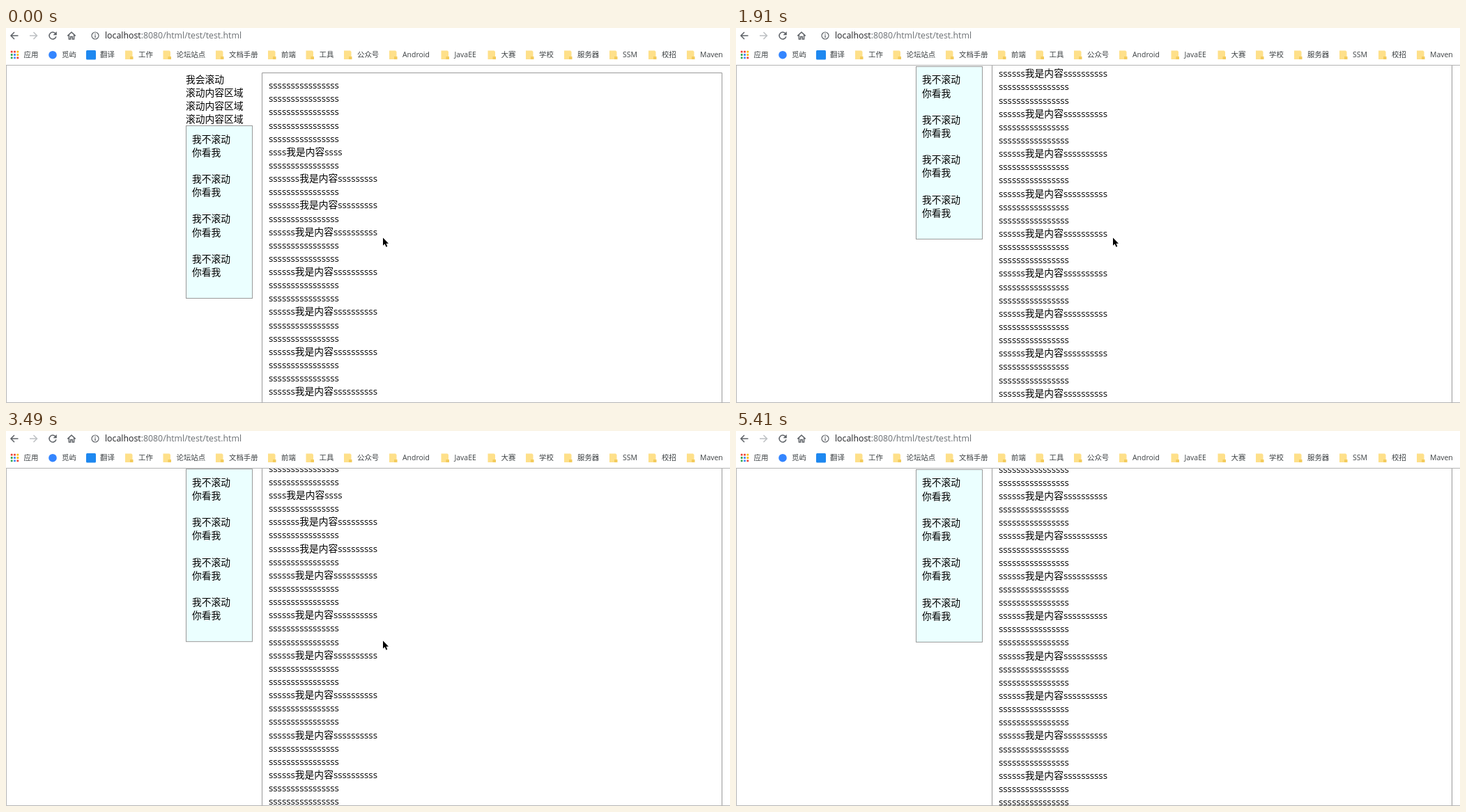
An HTML page for the animation above (5690 ms loop, 1039 by 539 pixels).

```html
<!DOCTYPE html>
<html lang="zh-CN">
<head>
<meta charset="utf-8">
<style>
html, body { margin: 0; width: 100%; height: 100%; overflow: hidden; background: #fff; }
svg { display: block; }
text { font: 13.77px "Open Sans", "Noto Sans CJK SC", "Noto Sans CJK", sans-serif; white-space: pre; }
.latin { font-size: 13.23px; }
.url { font-size: 12.33px; }
.mark { font-size: 10.45px; fill: #3c4043; }
.icon { fill: none; stroke: #5f6368; stroke-width: 1.5; }
.line { stroke: #999; fill: none; }
</style>
</head>
<body>
<svg width="1039" height="539" viewBox="0 0 1039 539">
  <defs><clipPath id="view"><rect y="54" width="1039" height="484"/></clipPath></defs>
  <g clip-path="url(#view)">
    <g id="page">
      <path class="line" d="M367.5 900V64.5H1027.5V900"/>
    </g>
    <g id="side">
      <rect class="line" style="fill:#ebffff" x="258.5" y="140.5" width="95" height="248"/>
    </g>
  </g>
  <path class="line" style="stroke:#b4b4b4" d="M0 53.5H1039M.5 54V538.5H1039"/>
  <g id="bar">
    <path class="icon" d="M17.5 11H7.5M12 6L7 11L12 16"/>
    <path class="icon" style="stroke:#bdc0c3" d="M34 11H44M39.5 6L44.5 11L39.5 16"/>
    <path class="icon" d="M71.2 8.2A5 5 0 1 0 71.9 12.2"/>
    <path fill="#5f6368" d="M72.8 5V10.2H67.6Z"/>
    <path class="icon" d="M88.3 11.4L94 6L99.7 11.4M90.4 10V16H92.7V12.4H95.3V16H97.6V10"/>
    <circle class="icon" style="stroke-width:1.2" cx="128" cy="11" r="5"/>
    <path class="icon" style="stroke-width:1.3" d="M128 10.3V14M128 8V9.3"/>
    <text class="url" x="142" y="15" fill="#202124">localhost<tspan fill="#6b6f73">:8080/html/test/test.html</tspan></text>
    <circle cx="67" cy="38.7" r="5.8" fill="#3385ff"/>
    <rect x="115" y="32" width="14" height="13.5" rx="1.5" fill="#1e88f0"/>
  </g>
  <path id="cursor" d="M0 0V11.2L2.6 8.8L4.5 13.2L6.3 12.4L4.5 8.2H8Z"/>
</svg>
<script>
const LOOP = 5690, PITCH = 19.14, STUCK = 85.1;
const $ = id => document.getElementById(id);

function add(parent, name, attrs, text = "") {
  const el = document.createElementNS("http://www.w3.org/2000/svg", name);
  for (const key in attrs) el.setAttribute(key, attrs[key]);
  el.textContent = text;
  parent.append(el);
  return el;
}

// Bookmarks bar
const dots = ["#ea4335", "#ea4335", "#fbbc04", "#34a853", "#4285f4", "#fbbc04", "#34a853", "#4285f4", "#ea4335"];
dots.forEach((fill, i) => add($("bar"), "rect", {
  x: 6.8 + i % 3 * 4.3, y: 32.8 + Math.floor(i / 3) * 4.3, width: 2.8, height: 2.8, rx: 0.6, fill
}));
const label = (x, name) => add($("bar"), "text", { class: "mark", x, y: 42.3 }, name);
label(25.5, "应用");
label(80, "觅屿");
label(135, "翻译");
const folders = {
  工作: 171, 论坛站点: 225.5, 文档手册: 301, 前端: 376, 工具: 430.5, 公众号: 485, Android: 550,
  JavaEE: 624.5, 大赛: 691.5, 学校: 746, 服务器: 801, SSM: 866, 校招: 922, Maven: 977
};
for (const name in folders) {
  const x = folders[name];
  add($("bar"), "path", { fill: "#fee08a", d: `M${x} 32.5H${x + 9}L${x + 10.5} 34V45H${x}Z` });
  add($("bar"), "path", { fill: "#f3cb5c", d: `M${x + 7} 45V41H${x + 11.5}V45Z` });
  label(x + 19, name);
}

// Main column: s-runs with an optional phrase in the middle
function contentLine(k) {
  const el = add($("page"), "text", { x: 377, y: 87.1 + k * PITCH });
  const run = n => add(el, "tspan", { class: "latin" }, "s".repeat(n));
  const lead = k === 5 ? 4 : k === 7 || k === 9 ? 7 : k > 10 && k % 3 === 2 ? 6 : 0;
  if (!lead) return run(16);
  run(lead);
  add(el, "tspan", {}, "我是内容");
  run(k === 5 ? 4 : 16 - lead);
}
for (let k = 0; k < 41; k++) contentLine(k);

// Side column
["我会滚动", "滚动内容区域", "滚动内容区域", "滚动内容区域"].forEach((s, i) =>
  add($("page"), "text", { x: 258, y: 78.7 + i * PITCH }, s));
for (let i = 0; i < 4; i++)
  ["我不滚动", "你看我"].forEach((s, j) =>
    add($("side"), "text", { x: 267, y: 164.6 + (i * 3 + j) * PITCH }, s));

// [time, value...], each held until the next
const scrolls = [
  [0, 0], [560, 42], [710, 85.8], [1240, 87.1], [1360, 150], [1510, 171.6], [1910, 227.3], [2060, 257.1],
  [2490, 199.7], [2640, 50], [2790, 0], [3220, 3], [3340, 60], [3490, 85.8], [3740, 150], [3890, 169],
  [4020, 171.6], [4160, 200], [4290, 245], [4400, 257.1]
];
const pointer = [
  [0, 541, 301.5], [4670, 719, 372], [4830, 898, 464.5], [4980, 967, 510], [5130, 995, 524.5],
  [5280, 1004, 533], [5410, 1039, 560]
];
const held = (steps, t) => steps.findLast(step => step[0] <= t);

function draw(now) {
  const t = now % LOOP;
  const scroll = held(scrolls, t)[1];
  const [, x, y] = held(pointer, t);
  $("page").setAttribute("transform", `translate(0 ${-scroll})`);
  // The panel sticks to the top once scrolled past
  $("side").setAttribute("transform", `translate(0 ${-(scroll < 88 ? scroll : STUCK)})`);
  $("cursor").setAttribute("transform", `translate(${x} ${y})`);
}

const start = performance.now();
(function tick() {
  draw(performance.now() - start);
  requestAnimationFrame(tick);
})();
</script>
</body>
</html>
```
